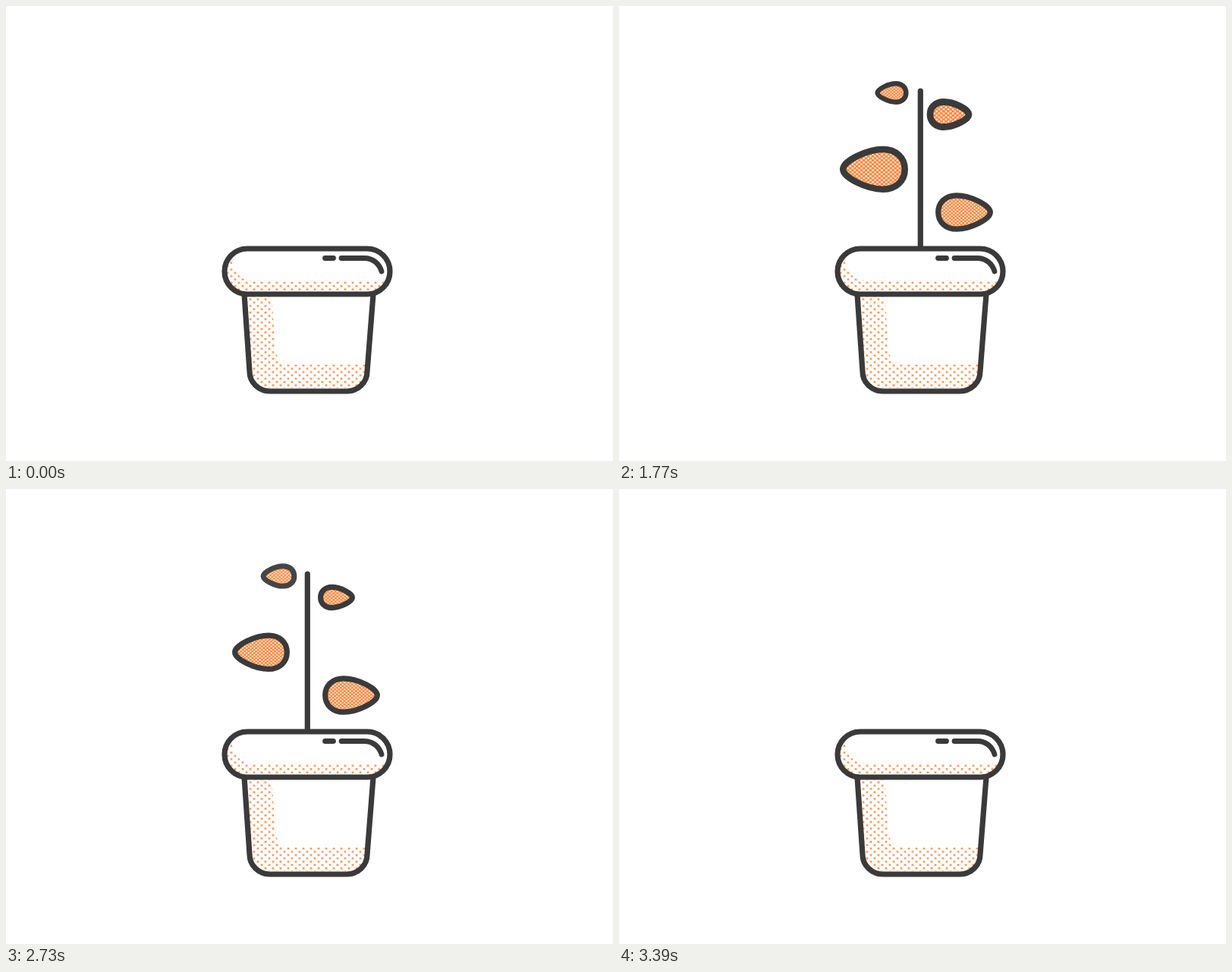
An HTML page that plays this animation: 800 by 600 pixels, repeating every 3.6 s.

```html
<!DOCTYPE html>
<html lang="en">
<head>
<meta charset="utf-8">
<title>Growing plant</title>
<style>
  html, body { margin: 0; width: 100%; height: 100%; overflow: hidden; background: #fff; }
  svg { display: block; }
  .line { fill: none; stroke: #3a3a3a; stroke-width: 7.2; stroke-linecap: round; stroke-linejoin: round; }
  .solid { fill: #fff; }
  .shine { stroke-width: 6.8; }
  .line.leaf { fill: url(#dense); }
  pattern { fill: #f78842; }
</style>
</head>
<body>
<svg width="800" height="600" viewBox="0 0 800 600">
  <defs>
    <pattern id="dots" x="469.5" y="471.8" width="10" height="8.72" patternUnits="userSpaceOnUse">
      <circle cx="2.5" cy="2.18" r="1.45"/><circle cx="7.5" cy="6.54" r="1.45"/>
    </pattern>
    <pattern id="dense" width="5" height="4.4" patternUnits="userSpaceOnUse">
      <rect width="5" height="4.4"/>
      <g fill="#fff0e2"><circle cx="1.25" cy="1.1" r="1.08"/><circle cx="3.75" cy="3.3" r="1.08"/></g>
    </pattern>
  </defs>

  <path id="stem" class="line"/>
  <g id="leaves"></g>

  <!-- pot body -->
  <path class="solid" d="M314 380L321 482A27 26 0 0 0 348 508H449A27 26 0 0 0 476 482L484 380Z"/>
  <path fill="url(#dots)" d="M314 380H350L355 450Q356 473 378 473H475L474 484Q470 504 449 504H348Q325 504 321 482Z"/>
  <path class="line" d="M314 380L321 482A27 26 0 0 0 348 508H449A27 26 0 0 0 476 482L484 380"/>

  <!-- rim -->
  <rect class="solid" x="288" y="320" width="218" height="60" rx="30"/>
  <path fill="url(#dots)" d="M290 333H298C298 349 309 362 326 362H502Q494 379 476 379H318A30 30 0 0 1 288 350Z"/>
  <rect class="line" x="288" y="320" width="218" height="60" rx="30"/>
  <path class="line shine" d="M420.5 332.5H431.5M442 332.5H472C484 332.5 492 340 495 350"/>
</svg>
<script>
const LOOP = 3600, STEP = 30;
const BASE_Y = 318.5, STEM_HEIGHT = 206.5;
const stem = document.getElementById('stem');

// side: 1 points right, -1 points left; grow and wilt are times in ms
const leaves = [
  { x: 455, y: 272, side: 1, size: 1.01, grow: 1405, wilt: [2870, 3325] },
  { x: 336, y: 215.3, side: -1, size: 1.01, grow: 1562, wilt: [2838, 3278] },
  { x: 435.5, y: 143, side: 1, size: .615, grow: 1590, wilt: [2860, 3360] },
  { x: 359.5, y: 114.5, side: -1, size: .615, grow: 1637, wilt: [2690, 3390], falls: true }
];

const progress = (t, from, to) => Math.min(1, Math.max(0, (t - from) / (to - from)));

function leafPath(size) {
  const d = 'M-34 0C-34 -13 -24 -22 -10 -22C8 -22 34 -9 34 0C34 9 8 22 -10 22C-24 22 -34 13 -34 0Z';
  return d.replace(/-?\d+/g, n => n * size);
}

for (const leaf of leaves) {
  leaf.el = document.createElementNS('http://www.w3.org/2000/svg', 'path');
  leaf.el.setAttribute('class', 'line leaf');
  leaf.el.setAttribute('d', leafPath(leaf.size));
  document.getElementById('leaves').append(leaf.el);
}

function drawStem(t) {
  const grown = progress(t, 720, 1770), left = 1 - progress(t, 2739, 3390);
  const top = BASE_Y - STEM_HEIGHT * Math.min(grown, left) ** 2.75;
  stem.setAttribute('d', `M397.3 ${top}V326`);
  stem.style.display = t < 720 || t >= 3390 ? 'none' : '';
}

function drawLeaf(leaf, t) {
  const { x, y, side, grow, wilt, falls, el } = leaf;
  const pop = 1.22 * progress(t, grow, grow + 180) - .22 * progress(t, grow + 180, grow + 360);
  const gone = progress(t, ...wilt);
  const scale = pop * (1 - gone * (falls ? .45 : 1));
  const drop = falls ? 7.5 * gone : 0;
  el.setAttribute('transform', `translate(${x} ${y + drop}) scale(${scale * side} ${scale})`);
  el.style.opacity = falls ? 1 - gone : 1;
  el.style.display = scale > 0 && gone < 1 ? '' : 'none';
}

function draw() {
  const t = Math.floor(performance.now() % LOOP / STEP) * STEP;
  drawStem(t);
  leaves.forEach(leaf => drawLeaf(leaf, t));
  requestAnimationFrame(draw);
}
draw();
</script>
</body>
</html>
```
